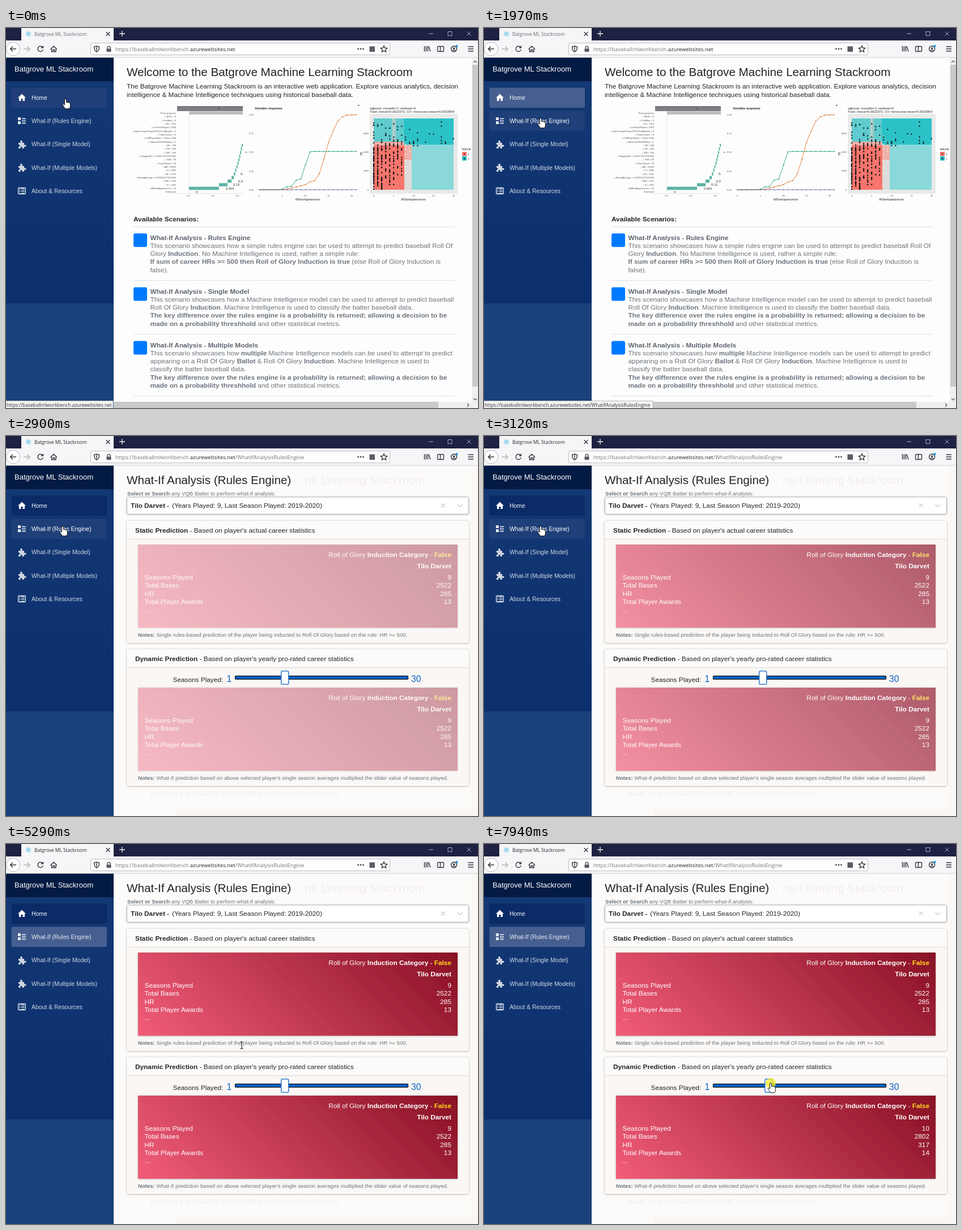
These frames come from a looping animation (833 px wide and 672 px high, 8000 ms). An HTML page:

```html
<!DOCTYPE html>
<html lang="en">
<head>
<meta charset="utf-8">
<title>Batgrove ML Stackroom</title>
<style>
html, body { margin: 0; width: 100%; height: 100%; overflow: hidden; background: #fdfdfd; }
svg { display: block; width: 833px; height: 672px; }
text { font-family: "Liberation Sans", Arial, sans-serif; white-space: pre; }
.ui { font-family: "Open Sans", "Noto Sans", sans-serif; }
.b { font-weight: bold; }
.ico { fill: none; stroke: #33343c; stroke-width: 1.4; }
</style>
</head>
<body>
<svg id="stage" viewBox="0 0 833 672"></svg>
<script>
const BASE = 11.82;
const bold = s => s.replace(/\*([^*]+)\*/g, '<tspan class="b">$1</tspan>');
const text = (x, y, s, size = BASE, fill = '#212529', more = '') =>
  `<text x="${x}" y="${y}" font-size="${size}" fill="${fill}" ${more}>${bold(s)}</text>`;
const rect = (x, y, w, h, fill, more = '') =>
  `<rect x="${x}" y="${y}" width="${w}" height="${h}" fill="${fill}" ${more}/>`;
const path = (d, more = '') => `<path d="${d}" ${more}/>`;
const END = 'text-anchor="end"', MID = 'text-anchor="middle"', UI = 'class="ui"';

let seed = 7;
const rnd = () => (seed = seed * 16807 % 2147483647) / 2147483647;

/* ---------- browser frame ---------- */
const HOST = 'https://baseballmlworkbench.';
const SITE = 'azurewebsites.net', ROUTE = '/WhatIfAnalysisRulesEngine';

function browser() {
  return rect(0, 0, 833, 22, '#1f2143') + rect(27, 0, 163, 23, '#f5f6f7') +
    rect(0, 22, 833, 30, '#f5f6f7') + rect(0, 51.5, 833, 1, '#d2d2d6') +
    '<circle cx="39.5" cy="10.5" r="4.5" fill="#a9dcee"/>' +
    text(50, 14, 'Batgrove ML Stackroom', 8.4, '#6a6a70', UI + ' id="tab"') +
    path('M176.5 7l7 7m0-7l-7 7', 'class="ico"') +
    path('M200 10h10m-5-5v10', 'stroke="#eee" stroke-width="1.3"') +
    path('M746 10h8M780 6.5h7v7h-7zM813.500 6.500l7 7m0-7l-7 7', 'fill="none" stroke="#a9abc0"') +
    '<circle cx="12.500" cy="37" r="12" fill="#fff" stroke="#b9b9bd"/>' +
    path('M18 37H7.500m4.500-4.500L7.500 37l4.500 4.500', 'class="ico" stroke-width="1.700"') +
    path('M31.500 37H42m-4.500-4.500L42 37l-4.500 4.500', 'fill="none" stroke="#b4b4b8" stroke-width="1.500"') +
    path('M64.500 34a4.700 4.700 0 1 0 .700 4.500M65.500 31.500v3.500h-3.500', 'class="ico"') +
    path('M78.500 37.500l5.700-5.300 5.700 5.300M80.500 37v5h2.500v-3.500h2.500v3.500h2.500v-5', 'class="ico"') +
    rect(149.5, 26.5, 528, 21, '#fff', 'stroke="#bcbcc2" rx="2"') +
    path('M160 32l4.500 1.300c0 4.500-1.500 7.500-4.500 9-3-1.500-4.500-4.500-4.500-9zM160 33.500v7', 'class="ico" stroke-width="1.200"') +
    rect(177.5, 36.5, 8, 5.5, '#55565d', 'rx="1"') +
    path('M179 37v-2a2.500 2.500 0 0 1 5 0v2', 'class="ico" style="stroke:#55565d"') +
    `<text x="193" y="41" font-size="9.46" fill="#73737a" ${UI}>${HOST}<tspan fill="#26262c">${SITE}</tspan><tspan id="route">${ROUTE}</tspan></text>` +
    [621.500, 626, 630.500].map(x => `<circle cx="${x}" cy="37" r="1.400" fill="#44454c"/>`).join('') +
    rect(641.5, 32.5, 9.5, 9.5, '#5b5c63') +
    path('M667 31.500l1.700 3.700 4 .400-3 2.700.900 4-3.600-2.100-3.600 2.100.900-4-3-2.700 4-.400z', 'class="ico" stroke-width="1.100"') +
    path('M738.500 32v9.500M741.500 32v9.500M744.500 32v9.500M746 32.500l3 9', 'class="ico"') +
    rect(761.5, 32.5, 11, 9, 'none', 'class="ico" rx="1.500"') + path('M766.500 33v8.500', 'class="ico"') +
    '<circle cx="790.500" cy="37" r="5" class="ico"/><circle cx="790.500" cy="36" r="1.800" fill="#33343c"/><path d="M787.500 40.500q3-3 6 0" class="ico"/><circle cx="795.500" cy="32" r="2.300" fill="#2ba6ea"/>' +
    path('M815.500 33h9.500m-9.500 4h9.500m-9.500 4h9.500', 'class="ico"');
}

/* ---------- sidebar ---------- */
function sidebar() {
  const puzzle = y => path(`M22 ${y - 3}h3.500q-1.500-4 1.500-4t1.500 4h3.500v4q3.500-1.500 3.500 1.300t-3.500 1.300v3.400h-3.500q1-3-1.300-3t-1.300 3H22v-3q2.500 0 2.500-2t-2.500-2z`, 'fill="#cfd6e2"');
  const rows = (x, w, y) => [-4.5, -0.5, 3.5].map(d => rect(x, y + d, w, 1.8, '#dfe4ee')).join('');
  const labels = ['Home', 'What-If (Rules Engine)', 'What-If (Single Model)', 'What-If (Multiple Models)', 'About &amp; Resources'];
  return rect(0, 52, 190, 620, '#1a4179') + rect(0, 94, 190, 393, 'url(#side)') + rect(0, 52, 190, 42, '#031a42') +
    text(15, 77, 'Batgrove ML Stackroom', 13, '#fff') +
    rect(9.5, 105.5, 168.5, 35.5, '#465f90', 'rx="3" id="home"') +
    rect(9.5, 146.5, 168.5, 35.5, '#465f90', 'rx="3" id="rules"') +
    path('M21 123.500l7-7 7 7h-2v5.500h-3.500v-4h-3v4H23v-5.500z', 'fill="#fff"') +
    rect(21, 158, 5, 5, '#e4e8f0') + rect(21, 165, 5, 5, '#e4e8f0') + rows(28, 7, 164) +
    puzzle(206) + puzzle(247) +
    rect(21.7, 282.5, 12.6, 11, 'none', 'stroke="#d5dbe6" stroke-width="1.400" rx="1"') +
    rows(27, 5.5, 288) + rows(23.5, 2, 288) +
    labels.map((s, i) => text(45, 126.7 + 41.3 * i, s, 10.45, i ? '#d0d8e5' : '#f4f6fa', `id="nav${i}"`)).join('');
}

/* ---------- welcome page ---------- */
function breakdown() {
  const names = ['Real_prognosis', '+ MVPs = 0', '+ FineMitts = 0', '+ ID = 7701', '+ LastYearPlayed = 2014',
    '+ UpperLeaguePlayerOfTheYearAwards = 0', '+ TripleCrowns = 0', '+ FullPlayerName = Tomas Veldi',
    '+ InductedToRollOfGlory = 1', '+ SB = 358', '+ HR = 260', '+ X2B = 544', '+ SluggingPct = 0.439771237155646',
    '+ X3B = 66', '+ YearsPlayed = 20', '+ AB = 11195', '+ H = 3465', '+ TB = 5791',
    '+ BattingAverage = 0.309513175155784', '+ RBI = 1311', '+ R = 1923', '+ AllStarAppearances = 14', '(Intercept)'];
  const edges = [323, 376, 391, 398, 402, 404.5, 406.5, 408.5, 410, 411.5, 413, 414.5, 416, 417.5];
  let s = rect(302, 138.5, 116, 8.5, '#7d7e84') + path('M302 139h116', 'stroke="#55565c"') + rect(323, 147.5, 95, 5.5, '#bcbdbf') +
    path('M323 153v139.500M300 292.500h118', 'stroke="#d8d8d8" stroke-width=".700"') +
    '<circle cx="376" cy="142.500" r="1.200" fill="#444"/>';
  names.forEach((n, i) => s += text(300, 152 + 6.34 * i, n, 3.95, '#4a4a4a', END));
  for (let k = 0; k < 13; k++)
    s += rect(edges[k], 280.7 - 6.34 * k, Math.max(2, edges[k + 1] - edges[k]), 5.6, '#5cb3a5');
  s += [['0', 335, 292], ['0.504', 388, 285.500], ['0.13', 401, 279], ['0.0', 410, 272.500], ['0.', 414, 260]]
    .map(([v, x, y]) => text(x, y, v, 5.6, '#222')).join('');
  return s + ['0.0', '0.4', '0.8'].map((v, i) => text(322 + 43 * i, 298, v, 4.2, '#555', MID)).join('');
}

function response() {
  const flat = n => Array(n).fill(286);
  const px = i => 447 + 8.15 * i;
  const green = [...flat(5), 285, 281, 280, 269, 267, 242, 219, ...Array(10).fill(218.3)];
  const orange = [...flat(6), 285, 283, 281, 279, 277, 272, 270, 258, 232, 202, 182, 165, 157, 154, 153.7, 153.500];
  const line = (ys, c) => path('M' + ys.map((y, i) => `${px(i)} ${y}`).join('L'), `fill="none" stroke="${c}" stroke-width=".900"`) +
    ys.map((y, i) => `<circle cx="${px(i)}" cy="${y}" r="1" fill="${c}"/>`).join('');
  return text(439, 143.5, '*Variable response*', 5.7) + '<circle cx="622.500" cy="137" r="1" fill="#111"/>' +
    ['1.00', '0.75', '0.50', '0.25', '0.00'].map((v, i) => text(437, 155 + 33.2 * i, v, 4.2, '#555', END)).join('') +
    text(0, 0, 'y', 5, '#333', 'transform="translate(425 221) rotate(-90)"') +
    [0, 5, 10, 15, 20].map(v => text(px(v), 298, v + '', 4.2, '#555', MID)).join('') +
    text(532.5, 304.5, 'AllStarAppearances', 5, '#222', MID) +
    line(green, '#2fa382') + line(orange, '#e07a35') + line(flat(22), '#7673ab');
}

function boundary() {
  let s = text(642, 143.5, 'xgboost: nrounds=1; verbose=0', 5.75) +
    text(642, 149.7, 'Train: mmce=0.0022371; CV: mmce.test.mean=0.0033554', 5.75) +
    rect(642, 152, 155, 141, '#e9e9e9') + rect(649, 160, 54, 42, '#5fcbce') + rect(681, 160, 7, 40, '#9fc9c6') +
    rect(702, 160, 88, 47, '#2bc2c7') + rect(649, 202, 54, 84, '#f7756c') + rect(649, 201, 54, 7, '#f0a59f') +
    rect(703, 207, 13, 26, '#efb0aa') + rect(703, 233, 13, 53, '#dedcda') + rect(716, 207, 74, 79, '#8ad8d9') +
    path('M649 204.500h54M684 160v45M703 207h87', 'stroke="#fff" stroke-width=".600" opacity=".7"');
  let dots = '', tris = '', pale = '';
  for (let c = 0; c < 10; c++) {
    const n = c < 3 ? 55 - 8 * c : 34 - 3 * c;
    for (let i = 0; i < n; i++) {
      const depth = c < 3 ? rnd() * 78 : 5 * c * rnd() + rnd() * 68;
      const spot = `M${649 + 7.03 * c} ${Math.max(190, 285 - depth)}h0`;
      c < 8 ? dots += spot : pale += spot;
    }
  }
  for (let i = 0; i < 62; i++) {
    const c = Math.floor(rnd() * (i < 42 ? 12 : 21));
    tris += `M${649 + 7.03 * c} ${(c > 9 ? 162 : 166) + rnd() * 46}l-1.700 3h3.400z`;
  }
  s += path(dots, 'stroke="#111" stroke-width="2.500" stroke-linecap="round"') +
    path(pale, 'stroke="#f3e9cf" stroke-width="2.300" stroke-linecap="round"') + path(tris, 'fill="#10282c"');
  s += ['6000', '4000', '2000', '0'].map((v, i) => text(640, 187.5 + 33.4 * i, v, 4.2, '#555', END)).join('') +
    [0, 5, 10, 15, 20].map((v, i) => text(649 + 35.2 * i, 298, v + '', 4.2, '#555', MID)).join('') +
    text(0, 0, 'TB', 5, '#222', 'transform="translate(628.500 226) rotate(-90)"') +
    text(719, 304.5, 'AllStarAppearances', 5, '#222', MID);
  return s + text(804.5, 216, 'Inducte', 4.9, '#222') + rect(805, 219, 8, 7.5, '#f7756c') + rect(805, 227, 8, 7.5, '#2bc2c7') +
    '<circle cx="809" cy="222.700" r="1" fill="#111"/>' + path('M809 229l-1.600 3h3.200z') +
    text(815, 224.5, '0', 4.2) + text(815, 232.5, '1', 4.2);
}

function welcome() {
  const key = ['*The key difference over the rules engine is a probability is returned; allowing a decision to be*',
    '*made on a probability threshhold* and other statistical metrics.'];
  const scenarios = [
    [374.500, '*What-If Analysis - Rules Engine*',
      'This scenario showcases how a simple rules engine can be used to attempt to predict baseball Roll Of',
      'Glory *Induction*. No Machine Intelligence is used, rather a simple rule:',
      '*If sum of career HRs &gt;= 500 then Roll of Glory Induction is true* (else Roll of Glory Induction is', 'false).'],
    [469.600, '*What-If Analysis - Single Model*',
      'This scenario showcases how a Machine Intelligence model can be used to attempt to predict baseball',
      'Roll Of Glory *Induction*. Machine Intelligence is used to classify the batter baseball data.', ...key],
    [564.700, '*What-If Analysis - Multiple Models*',
      'This scenario showcases how *multiple* Machine Intelligence models can be used to attempt to predict',
      'appearing on a Roll Of Glory *Ballot* &amp; Roll Of Glory *Induction*. Machine Intelligence is used to',
      'classify the batter baseball data.', ...key]];
  return rect(190, 52, 643, 620, '#fdfdfd') +
    text(213, 85, 'Welcome to the Batgrove Machine Learning Stackroom', 20.6) +
    text(213, 107, 'The Batgrove Machine Learning Stackroom is an interactive web application. Explore various analytics, decision') +
    text(213, 121.5, 'intelligence &amp; Machine Intelligence techniques using historical baseball data.') +
    breakdown() + response() + boundary() + text(225, 342, '*Available Scenarios:*') +
    [351.500, 446.500, 541.500, 650.500].map(y => path(`M225 ${y}h567`, 'stroke="#dfe1e3"')).join('') +
    scenarios.map(([y, ...lines]) => rect(225, y - 11.2, 24, 24, '#007bff', 'rx="3"') +
      lines.map((s, i) => text(254.5, y + 14.25 * i, s, BASE, i ? '#6c757d' : '#5d656d')).join('')).join('') +
    rect(822, 52, 11, 620, '#f0f0f0') + rect(823, 65, 10, 569, '#c9c9c9') +
    rect(190, 661, 632, 11, '#f0f0f0') + rect(190, 661, 573, 11, '#c9c9c9') +
    path('M825 61l3-3 3 3M825 655l3 3 3-3M814 664l3 3-3 3', 'fill="none" stroke="#555" stroke-width="1.200"');
}

/* ---------- analysis page ---------- */
const PLAYER = 'Tilo Darvet';

function prediction(dy, id) {
  const rows = ['Seasons Played', 'Total Bases', 'HR', 'Total Player Awards', '...'];
  const y = i => 254 + 14.3 * i + dy;
  return rect(233, 192 + dy, 564, 147, `url(#${id})`, 'filter="url(#soft)"') +
    `<text x="786" y="${214 + dy}" font-size="${BASE}" fill="#fff" ${END}>Roll of Glory <tspan class="b">Induction Category</tspan> - <tspan class="b" fill="#ffd91f">False</tspan></text>` +
    text(786, 234 + dy, `*${PLAYER}*`, BASE, '#fff', END) +
    rows.map((s, i) => text(244.5, y(i), s, BASE, '#fff')).join('') +
    [9, 2522, 285, 13].map((v, i) => text(786, y(i), v + '', BASE, '#fff', `${END} id="${id}${i}"`)).join('');
}

function panel(y, h, title, note) {
  return rect(213, y, 604, h, '#faf7f5', 'rx="3" filter="url(#soft)"') + rect(213, y, 604, 32, '#fcfbfa', 'rx="3"') +
    path(`M213 ${y + 32.500}h604`, 'stroke="#dedcda"') + text(228, y + 20.5, title) +
    text(233, y + h - 11, '*Notes:* ' + note, 9.57, '#6c757d');
}

function analysis() {
  const ghost = 'opacity=".055"';
  return rect(190, 52, 643, 620, '#fcfbfa') + rect(821, 52, 12, 620, '#faf7f4') + rect(299, 660, 534, 12, '#faf6f3') +
    text(527, 85, 'ne Learning Stackroom', 20.6, '#401000', ghost) +
    text(556, 121.5, 'eball data.', BASE, '#401000', ghost) +
    text(254.5, 635.8, '*made on a probability threshhold* and other statistical metrics.', BASE, '#401000', 'opacity=".04"') +
    text(213, 85, 'What-If Analysis (Rules Engine)', 20.65) +
    text(214, 104.5, '*Select or Search* any VQB Batter to perform what-if analysis:', 9.6, '#6c757d') +
    rect(213.5, 108, 603, 30, '#fff', 'rx="3" stroke="#b9b9b9" filter="url(#soft)"') +
    text(220, 127, `*${PLAYER} -*`) + text(293, 127, '(Years Played: 9, Last Season Played: 2019-2020)') +
    path('M768 119.500l7 7m0-7l-7 7M796.500 121l4.500 4.500 4.500-4.500', 'fill="none" stroke="#cbcbcb" stroke-width="1.200"') +
    panel(150, 216, "*Static Prediction* - Based on player's actual career statistics",
      'Single rules-based prediction of the player being Inducted to Roll Of Glory based on the rule: HR &gt;= 500.') +
    panel(377, 242, "*Dynamic Prediction* - Based on player's yearly pro-rated career statistics",
      "What-If prediction based on above selected player's single season averages multiplied the slider value of seasons played.") +
    text(294.5, 434.5, 'Seasons Played:') + text(389.5, 434.5, '1', 15.6, '#0b62c4') + text(715, 434.5, '30', 15.6, '#0b62c4') +
    rect(404.5, 424.5, 305, 5.5, '#0a68d6', 'stroke="#10151c" stroke-width="1.300" rx="1"') +
    rect(485.7, 415.6, 13, 23.6, '#fff', 'rx="2.500" stroke="#1467c8" stroke-width="1.300" id="thumb"') +
    `<g id="cards">${prediction(0, 'fixed')}${prediction(253, 'moving')}</g>`;
}

/* ---------- assembly ---------- */
const redFill = (id, cy) => `<linearGradient id="${id}" gradientUnits="userSpaceOnUse" x1="337.250" y1="${cy + 177.750}" x2="692.750" y2="${cy - 177.750}"><stop stop-color="#f25d79"/><stop offset="1" stop-color="#881024"/></linearGradient>`;

document.getElementById('stage').innerHTML = `<defs>
  <linearGradient id="side" x2="0" y2="1"><stop stop-color="#133873"/><stop offset="1" stop-color="#0c2f6d"/></linearGradient>
  ${redFill('fixed', 265.500)}${redFill('moving', 518.500)}
  <filter id="soft" x="-5%" y="-10%" width="110%" height="120%"><feDropShadow dx="0" dy=".500" stdDeviation="1.500" flood-opacity=".35"/></filter>
  </defs>` + welcome() + `<g id="analysis">${analysis()}</g>` + sidebar() + browser() +
  `<g id="status">${rect(-1, 659.5, 190, 13, '#f3f3f4', 'stroke="#b9b9bd" id="statusBox"')}${text(1, 669.500, '', 8.3, '#33343a', UI + ' id="link"')}</g>` +
  '<circle id="click" r="9" fill="#f7ec1e" opacity=".75"/>' +
  '<g id="pointer">' +
  path('M-1.500 10V1a1.500 1.500 0 0 1 3 0V5.500q1.500-1 2.500.3q1.500-.8 2.400.5q2-.4 2 1.600V12q0 2.500-1.800 4.800H-.5Q-2.600 13.500-4.600 10.600Q-5.400 9-3.800 8.600Q-2.600 8.600-1.500 10Z', 'id="hand" fill="#fff" stroke="#111" stroke-width="1"') +
  path('M0 0V12.500L2.800 10L5 15L7 14L4.900 9.300H9Z', 'id="arrow" fill="#fff" stroke="#111" stroke-width=".900"') +
  path('M-2.500-6H2.500M0-6V6M-2.500 6H2.500', 'id="beam" fill="none" stroke="#111" stroke-width="1.100"') + '</g>';

const el = {};
document.querySelectorAll('[id]').forEach(e => el[e.id] = e);
const set = (id, name, v) => el[id].setAttribute(name, v);
const show = (id, on) => set(id, 'visibility', on ? 'visible' : 'hidden');

/* ---------- timeline ---------- */
const LOOP = 8000;
// start, end, steps, dx, dy
const moves = [
  [1440, 1970, 8, -5, 34], [4430, 4910, 7, 174, 52], [5130, 5290, 3, 142, 144],
  [5540, 5660, 3, 57, 64], [5910, 6130, 4, 16, 3], [7780, 7940, 3, 17, 0]];
const cardFade = [[0, 0], [2590, .08], [2750, .2], [2820, .3], [2900, .4], [2960, .48], [3040, .57],
  [3120, .67], [3280, .78], [3430, .87], [3640, .95], [4430, 1]];
const pageFade = [[0, 0], [2380, .3], [2450, .6], [2520, .85], [2590, 1]];

const hold = (table, t) => table.filter(k => k[0] <= t).pop()[1];
const stepped = (t, a, b, n) => t < a ? 0 : Math.min(1, (Math.floor((t - a) / (b - a) * (n - 1) + 1e-6) + 1) / n);

function draw(t) {
  let x = 105, y = 126;
  for (const [a, b, n, dx, dy] of moves) {
    const p = stepped(t, a, b, n);
    x += dx * p;
    y += dy * p;
  }
  const kind = x < 178 || x > 483 ? 'hand' : t >= 5290 && t < 5540 ? 'beam' : 'arrow';
  for (const k of ['hand', 'arrow', 'beam']) show(k, k === kind);
  set('pointer', 'transform', `translate(${x} ${y})`);
  set('click', 'cx', x);
  set('click', 'cy', y);
  show('click', t >= 2220 && t < 2380 || t >= 6990);

  const overHome = y < 142, overRules = !overHome && x < 178, moved = t >= 2220, left = t >= 2380;
  set('home', 'fill', left ? '#0a2b66' : overHome ? '#203f78' : '#465f90');
  set('rules', 'fill', overRules ? '#1f3f78' : '#465f90');
  show('rules', overRules || left);
  set('nav1', 'fill', overRules ? '#fff' : left ? '#e6eaf2' : '#d0d8e5');

  set('tab', 'fill', moved ? '#2a2a30' : '#6a6a70');
  el.route.textContent = moved ? ROUTE : '';
  el.link.textContent = HOST + SITE + (overHome ? '' : ROUTE);
  set('statusBox', 'width', overHome ? 190 : 299);
  show('status', !left);

  set('analysis', 'opacity', hold(pageFade, t));
  set('cards', 'opacity', hold(cardFade, t));

  const slid = x > 498;
  set('thumb', 'x', slid ? 495.8 : 485.7);
  (slid ? [10, 2802, 317, 14] : [9, 2522, 285, 13]).forEach((v, i) => el['moving' + i].textContent = v);
}

const start = performance.now();
function tick() {
  draw((performance.now() - start) % LOOP);
  requestAnimationFrame(tick);
}
tick();
</script>
</body>
</html>
```
